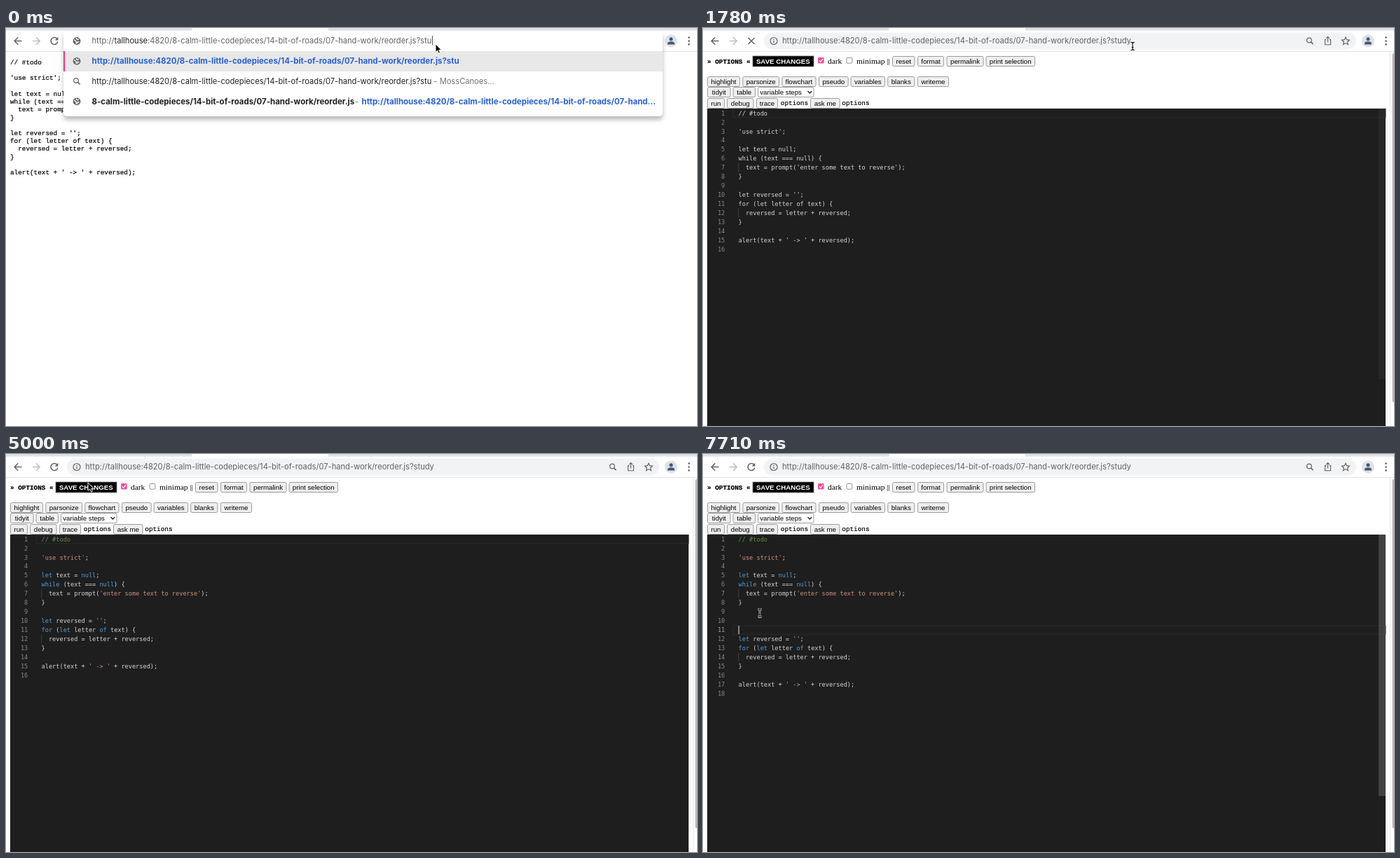
Recreate the animation shown at these times as an HTML page. Size 986 by 568 pixels, loop 8 s.

```html
<!DOCTYPE html>
<html lang="en">
<head>
<meta charset="utf-8">
<title>Code study page</title>
<style>
html, body { margin: 0; width: 100%; height: 100%; overflow: hidden; background: #fff; }
svg { display: block; width: 100%; height: 100%; }
text { white-space: pre; }
.ui { font: 11.15px Inter, Roboto, sans-serif; }
.btn { font: 9.7px "Liberation Sans", Arial, sans-serif; }
.serif { font: 11.4px "Liberation Serif", Times, serif; }
.courier { font: 9.33px "Liberation Mono", Courier, monospace; stroke: #000; stroke-width: .2px; }
.code { font: 8.6px "DejaVu Sans Mono", Menlo, monospace; }
.bold { font-weight: 700; }
.ui.bold { font-size: 11.46px; }
</style>
</head>
<body>
<svg id="stage" viewBox="0 0 986 568"></svg>
<script>
const LOOP = 8000;
const stage = document.getElementById('stage');

const HOST = 'tallhouse';
const PATH = '8-calm-little-codepieces/14-bit-of-roads/07-hand-work/reorder.js';
const ADDRESS = `http://${HOST}:4820/${PATH}?`;
const GREY = '#5f6368', BLUE = '#2a62d0', PINK = '#f4519f';

const SOURCE = [
  '// #todo', '', "'use strict';", '',
  'let text = null;', 'while (text === null) {',
  "  text = prompt('enter some text to reverse');", '}', '',
  "let reversed = '';", 'for (let letter of text) {',
  '  reversed = letter + reversed;', '}', '',
  "alert(text + ' -> ' + reversed);", ''
];

// Timelines: [start ms, value...]
const POINTER = [
  [0, 'arrow', 613, 23], [590, 'beam', 613, 26], [2160, 'beam', 523, 88],
  [2460, 'arrow', 240, 97], [2730, 'beam', 154, 136], [2970, 'beam', 152, 154],
  [3150, 'beam', 150, 128], [3300, 'arrow', 140, 82], [3450, 'arrow', 128, 56],
  [3600, 'arrow', 122, 47], [3830, 'arrow', 112, 60], [4080, 'arrow', 93, 90],
  [4330, 'arrow', 98, 47], [4650, 'arrow', 104, 46], [4820, 'arrow', 111, 43],
  [5000, 'arrow', 117, 41], [5900, 'arrow', 134, 108], [6080, 'arrow', 153, 200],
  [6230, 'beam', 104, 262], [6380, 'beam', 88, 238], [6530, 'beam', 81, 227]
];
const SLIDER = [
  [0, 0], [1780, .1], [1960, .05], [2160, 0], [2730, .4], [3300, .2],
  [3450, 0], [6230, .4]
];
const TYPED = [[0, 'stu'], [150, 'stud'], [440, 'study']];
const ENTERS = [[0, 0], [7420, 1], [7570, 2]];

const at = (track, t) => track.filter(k => k[0] <= t).pop().slice(1);

const text = (cls, x, y, str, fill = '#000', extra = '') =>
  `<text class="${cls}" x="${x}" y="${y}" fill="${fill}" ${extra}>${str}</text>`;
const rect = (x, y, w, h, fill, extra = '') =>
  `<rect x="${x}" y="${y}" width="${w}" height="${h}" fill="${fill}" ${extra}/>`;
const line = (d, color, width = 1.3, extra = '') =>
  `<path d="${d}" fill="none" stroke="${color}" stroke-width="${width}" ${extra}/>`;
const ring = (x, y, r, color, width = 1.2) =>
  `<circle cx="${x}" cy="${y}" r="${r}" fill="none" stroke="${color}" stroke-width="${width}"/>`;

const globe = y => `<circle cx="101" cy="${y}" r="5.4" fill="${GREY}"/>` +
  line(`M97.2 ${y - 2}l3 3v3.2M100.5 ${y - 4.4}v1.6l2.2 1 1-1.4M102 ${y + 3.6}v-2.4h2.6`, '#fff', 1.3);
const magnifier = (x, y) => ring(x - 1, y - 1, 3.3, GREY) +
  line(`M${x + 1.4} ${y + 1.4}l3.2 3.2`, GREY, 1.5);

function button(label, x, right, y) {
  return rect(x + .5, y + .5, right - x - 1, 14, '#efefef', 'rx="2" stroke="#858585" stroke-width=".8"') +
    text('btn', (x + right) / 2, y + 10.8, label, '#000', 'text-anchor="middle"');
}

function checkbox(x, y, on, fill = PINK) {
  if (!on) return rect(x + .4, y + .4, 7.8, 7.8, '#fff', 'rx="1.4" stroke="#767676" stroke-width=".8"');
  return rect(x, y, 8.6, 8.6, fill, 'rx="1.4"') +
    line(`M${x + 1.9} ${y + 4.4}l1.8 1.9 3.2-4.2`, '#fff', 1.3);
}

function toolbar(loading) {
  const reload = loading
    ? line('M64.5 14l9 9M73.5 14l-9 9', GREY, 1.5)
    : line('M73.2 15.6A5 5 0 1 0 73.9 19.6', GREY, 1.5) + `<path d="M74.4 12.8v4.8h-4.8z" fill="${GREY}"/>`;
  return rect(0, 0, 986, 34, '#fff') + rect(0, 0, 986, 3.6, '#dee1e6') +
    rect(265, 0, 195, 4, '#fff') + rect(0, 33, 986, 1, '#e2e3e5') +
    line('M22.5 18.5h-10M17.3 13.3l-5.2 5.2 5.2 5.2', GREY, 1.5) +
    line('M38 18.5h10M43 13.3l5.2 5.2-5.2 5.2', '#bcbfc3', 1.5) + reload +
    '<circle cx="949" cy="18.5" r="9" fill="#dde1e8"/>' +
    '<circle cx="949" cy="15.8" r="2.5" fill="#485674"/><path d="M944 23.5v-1.2q0-3 5-3t5 3v1.2z" fill="#485674"/>' +
    [13.6, 18.5, 23.4].map(y => `<circle cx="974.5" cy="${y}" r="1.3" fill="${GREY}"/>`).join('');
}

function addressBar(query) {
  return rect(87, 6.5, 845, 24, '#f1f3f4', 'rx="12"') +
    ring(101, 18.5, 5, GREY) + line('M101 17.8v3.4M101 15.3v1.4', GREY, 1.2) +
    text('ui', 113, 22.4, ADDRESS + query, GREY) + magnifier(866, 18.5) +
    line('M889.2 16.6h-1.6v7.2h8v-7.2h-1.6M891.6 20.5v-7.5M889 15.2l2.6-2.6 2.6 2.6', GREY, 1.1) +
    line('M917 13.2l1.6 3.5 3.8.4-2.8 2.6.8 3.8-3.4-1.9-3.4 1.9.8-3.8-2.8-2.6 3.8-.4z', GREY, 1.2);
}

function suggestions(query, rows) {
  const bottom = rows === 3 ? 126 : 97;
  const url = ADDRESS + query;
  let out = rect(82, 4, 855, bottom - 4, '#fff', 'rx="5" style="filter:drop-shadow(0 5px 3px #0004)"') +
    rect(82, 0, 855, 3.6, '#dee1e6') + rect(265, 0, 195, 6, '#fff') +
    rect(82, 33, 855, 29, '#e8e8e9') + rect(82, 33, 2.2, 29, '#d4458c') +
    globe(18.5) + globe(47.3) + magnifier(101, 76) +
    text('ui', 122.5, 22.4, url.replace(HOST, `<tspan fill="#202124">${HOST}</tspan>`) +
      '<tspan fill="#000" dx="-.5" font-weight="300">|</tspan>', GREY) +
    text('ui bold', 122.5, 51.2, url, BLUE) +
    text('ui', 122.5, 80, `${url}<tspan fill="#70757a"> - MossCanoes...</tspan>`, '#202124');
  if (rows === 3) {
    out += globe(104.8) + text('ui bold', 122.5, 108.8, PATH, '#202124') +
      text('ui', 498, 108.8, '-', '#70757a') +
      text('ui bold', 507.5, 108.8, ADDRESS.slice(0, ADDRESS.indexOf('-work')) + '...', BLUE);
  }
  return out;
}

const plainPage = () => SOURCE.map((s, i) => text('courier', 6, 52 + i * 11.22, s)).join('');

function controls(ready) {
  let out = text('courier bold', 6, 50.8, '» OPTIONS «') +
    rect(71, 40, 87, 15, '#000', 'stroke="#777" stroke-width=".8"') +
    text('btn bold', 114.3, 50.9, 'SAVE CHANGES', '#fff', 'text-anchor="middle"') +
    checkbox(164, 42, true) + text('serif', 178, 51, 'dark') +
    checkbox(204.6, 42, false) + text('serif', 219, 51, 'minimap ||') +
    button('reset', 270, 302.5, 40) + button('format', 306, 344, 40) +
    button('permalink', 347.5, 400.5, 40) + button('print selection', 403.5, 474, 40) +
    button('highlight', 6, 53, 69) + button('parsonize', 56.3, 109, 69) +
    button('flowchart', 112.3, 161.5, 69) + button('pseudo', 165, 207.7, 69) +
    button('variables', 210.6, 260, 69) + button('blanks', 263.2, 302.3, 69) +
    button('writeme', 305.8, 351, 69) + button('tidyit', 6, 39.6, 84) +
    button('run', 6, 31, 100) + button('debug', 34, 72.5, 100);
  if (ready) {
    out += button('table', 42.5, 75, 84) +
      rect(78.5, 84.5, 79.5, 14, '#fff', 'rx="2" stroke="#858585" stroke-width=".8"') +
      text('btn', 81.2, 94.8, 'variable steps') + line('M149.4 90l2.9 3 2.9-3', '#222', 1.3) +
      button('trace', 76, 107, 100) + text('courier', 110.8, 110.4, 'options') +
      button('ask me', 153, 195.5, 100) + text('courier', 198.3, 110.4, 'options');
  }
  return out + rect(980, 34, 1, 534, '#e8e8e8') + rect(983.5, 36, 5, 498, '#b9b9b9', 'rx="2"');
}

const paint = s => s.replace(/('[^']*')|(\/\/.*)|\b(?:let|while|for|of|null)\b/g, (m, str, note) =>
  `<tspan fill="${str ? '#ce9178' : note ? '#608b4e' : '#569cd6'}">${m}</tspan>`);

function editor({ colored, active, enters, slider, caret }) {
  const lines = SOURCE.slice();
  lines.splice(9, 0, ...Array(enters).fill(''));
  const top = i => 115 + i * 12.96;
  let out = rect(6, 115, 968, 453, '#1e1e1e') +
    rect(43, top(active) + .4, 931, 12.2, 'none', 'stroke="#2b2b2b" stroke-width="1"');
  lines.forEach((s, i) => {
    out += text('code', 31.3, top(i) + 9.6, i + 1, i === active && caret ? '#a0a0a0' : '#858585', 'text-anchor="end"') +
      text('code', 50.6, top(i) + 9.6, colored ? paint(s) : s, '#d4d4d4');
    if (s.startsWith('  ')) out += rect(50.4, top(i), .8, 12.96, '#484848');
  });
  if (caret) out += rect(50.5, top(active) + .5, 1.2, 12, '#c8c8c8');
  const height = 386 - enters * 6.5;
  return out + rect(964, 115, 10, height, '#797979', `opacity="${slider}"`);
}

function optionsMenu() {
  const item = (y, label, on, fill) => checkbox(125.2, y - 5.4, on, fill) + text('serif', 139.3, y + 3.7, label);
  const field = y => rect(122.8, y, 105, 15, '#fbfbfb', 'stroke="#858585" stroke-width=".8"');
  return rect(111, 115, 138, 298, '#fafafa', 'stroke="#aaa" stroke-width=".6"') +
    text('serif', 122.5, 132.6, 'variables:') +
    [135.6, 220.6, 263, 319.8].map(field).join('') +
    [198.8, 242, 298.8, 355].map(y => rect(122, y - .5, 115.5, 1, '#b0b0b0')).join('') +
    item(158.4, 'declare', true) + item(172.3, 'read', true) + item(186.4, 'assign', true, '#f0117f') +
    item(213.4, 'operators:', true) + item(256.3, 'control flow:', true) +
    item(286, 'error handling', false) + item(313, 'function calls:', true) +
    item(342.8, 'this', false) + item(369.7, 'lines', true) +
    item(383.8, 'steps', true) + item(397.7, 'console', true);
}

function pointer([kind, x, y]) {
  const move = `transform="translate(${x} ${y})"`;
  if (kind === 'arrow') {
    return `<path ${move} d="M0 0V11.4L2.7 9 4.5 13.1 6.4 12.3 4.7 8.3H8.2Z" fill="#000" stroke="#fff" stroke-width=".9"/>`;
  }
  const beam = 'M-2.6 -5.6Q0 -5.6 0 -4Q0 -5.6 2.6 -5.6M0 -4V4M-2.6 5.6Q0 5.6 0 4Q0 5.6 2.6 5.6M-1.4 1.8H1.4';
  return line(beam, '#fff', 2.5, move) + line(beam, '#000', 1.1, move);
}

function draw(t) {
  const [query] = at(TYPED, t);
  const [enters] = at(ENTERS, t);
  const searching = t < 590;
  const ready = t >= 1780;
  const clicked = t >= 6820;

  let out = t < 1340 ? plainPage() : controls(ready);
  out += toolbar(t >= 590 && t < 2160);
  out += searching ? suggestions(query, t < 150 ? 3 : 2) : addressBar(query);
  if (ready) {
    out += editor({
      colored: t >= 1960, active: clicked ? 8 + enters : 0,
      enters, slider: at(SLIDER, t)[0], caret: clicked
    });
  }
  if (t >= 5900 && t < 6230) out += optionsMenu();
  return out + pointer(at(POINTER, t));
}

let shown = '';
function tick() {
  const picture = draw(performance.now() % LOOP);
  if (picture !== shown) stage.innerHTML = shown = picture;
  requestAnimationFrame(tick);
}
tick();
</script>
</body>
</html>
```
